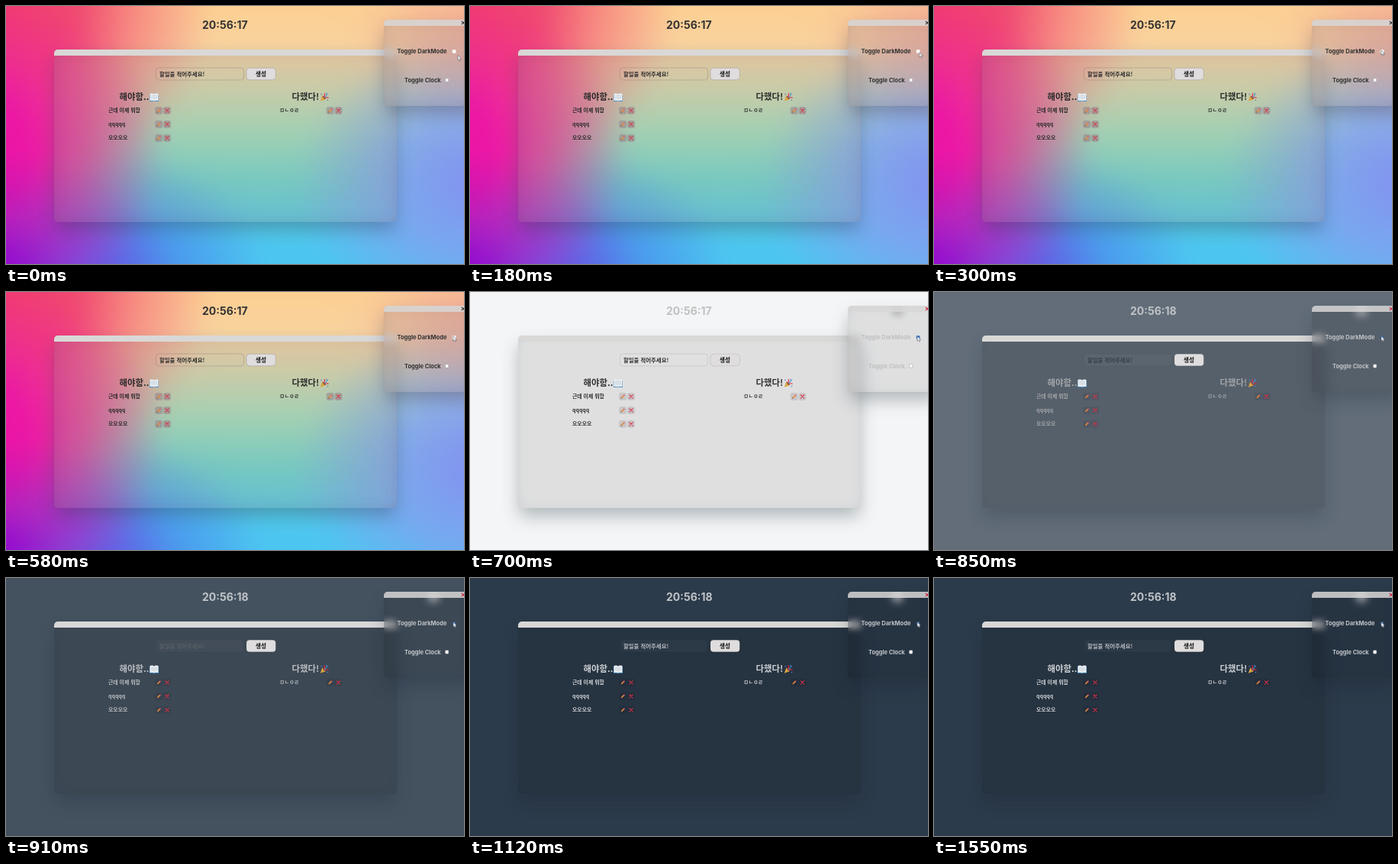
Animation, 600 px wide and 338 px high, one loop 1580 ms. Source, as an HTML page:

```html
<!DOCTYPE html>
<html lang="ko">
<head>
<meta charset="utf-8">
<title>Todo dark mode</title>
<style>
@property --page { syntax: "<color>"; inherits: true; initial-value: #fff; }
@property --soft { syntax: "<color>"; inherits: true; initial-value: #333; }
@property --head { syntax: "<color>"; inherits: true; initial-value: #2b2b2b; }
@property --hint { syntax: "<color>"; inherits: true; initial-value: #2b2b2b; }
@property --glass { syntax: "<color>"; inherits: true; initial-value: #0000; }
@property --chip { syntax: "<color>"; inherits: true; initial-value: #0000; }
@property --rim { syntax: "<color>"; inherits: true; initial-value: #0000; }
@property --shade { syntax: "<color>"; inherits: true; initial-value: #0000; }
@property --check { syntax: "<color>"; inherits: true; initial-value: #fff; }

:root { animation: tone 1580ms linear infinite, hint 1580ms linear infinite; }
html, body { margin: 0; width: 100%; height: 100%; overflow: hidden; }
.stage { position: relative; width: 600px; height: 338px; overflow: hidden; background: var(--page); }
.stage > * { position: absolute; }
svg { left: 0; top: 0; width: 600px; height: 338px; }

/* Wallpaper: soft blobs over a vertical blend, oversized so the blur has no edge */
.sky {
  inset: -60px;
  filter: blur(14px);
  background:
    radial-gradient(230px 150px at 50px 400px, #9000d0, #9a10d099 35%, transparent),
    radial-gradient(270px 220px at 0 250px, #ee10a8, #ec18a4 35%, #ec2896bf 60%, transparent),
    radial-gradient(290px 260px at 40px 60px, #f23c69, #f04a70 40%, #f56e78b3 65%, transparent),
    radial-gradient(170px 110px at 680px 100px, #eb9696b3, transparent),
    radial-gradient(240px 190px at 680px 290px, #8290f2, #82a0f0cc 50%, transparent),
    radial-gradient(190px 160px at 210px 410px, #4a82ec, #4a8cecb3 45%, transparent),
    linear-gradient(#fdd092 60px, #f6d2a0 120px, #d5dcae 170px, #a0e2bc 230px, #6cd8cc 290px, #4cc6f0 370px);
  animation: day 1580ms step-end infinite;
}
.panel {
  background: var(--glass);
  box-shadow: 0 12px 22px -2px var(--shade), inset 0 0 22px -4px var(--rim);
  border-radius: 5px;
  overflow: hidden;
}
.panel::before { content: ""; display: block; height: 8px; background: #d9d8d7; }
.main { left: 63px; top: 57px; width: 449px; height: 226px; }
.side { left: 495px; top: 18px; width: 120px; height: 113px; backdrop-filter: blur(5px); }
.side::before { opacity: .85; }
.ghost { left: 552px; top: 18px; width: 16px; height: 14px; border-radius: 6px; background: var(--soft); animation: night 1580ms step-end infinite; }

text { font: 700 7.5px Inter, sans-serif; fill: var(--soft); }
.ko text { font-family: "Noto Sans CJK KR", "Noto Sans CJK", sans-serif; font-size: 6.9px; fill: var(--head); }
.ko .title { font-size: 11.4px; }
.ko .hint { font-size: 7.4px; fill: var(--hint); }
.ko .press { font-size: 7.6px; fill: #111; }
.clock { font-size: 14px; }
.sec17 { animation: day 1580ms -110ms step-end infinite; }
.before { animation: before 1580ms step-end infinite; }
.after { animation: after 1580ms step-end infinite; }
.close { fill: none; stroke-width: 1.1; animation: close 1580ms step-end infinite; }
.cursor { animation: move 1580ms linear infinite; }

@keyframes tone {
  0%, 42.69% {
    --page: #fff; --soft: #333; --head: #2b2b2b; --glass: rgba(155,148,150,.22);
    --chip: rgba(150,130,136,.55); --rim: rgba(80,55,80,.2);
    --shade: rgba(40,50,80,.32); --check: #fff;
  }
  42.7% {
    --page: #fff; --soft: #c0c0c0; --head: #2b2b2b; --glass: rgba(10,0,8,.085);
    --chip: rgba(110,100,105,.2); --rim: rgba(60,60,60,.12);
    --shade: rgba(60,78,84,.38); --check: #2968c8;
    animation-timing-function: ease;
  }
  67.7%, 100% {
    --page: #2c3b4b; --soft: #c0c4c8; --head: #cdd0d3; --glass: rgba(0,0,0,.12);
    --chip: rgba(20,20,45,.14); --rim: rgba(20,28,40,.06);
    --shade: rgba(20,28,45,.25); --check: #35618a;
  }
}
@keyframes hint {
  0%, 42.7% { --hint: #2b2b2b; }
  53.8% { --hint: #394048; }
  69%, 100% { --hint: #b6babf; }
}
@keyframes day { 0% { opacity: 1; } 42.7%, 100% { opacity: 0; } }
@keyframes night { 0% { opacity: 0; } 42.7%, 100% { opacity: .8; } }
@keyframes before { 0% { opacity: 1; } 50%, 100% { opacity: 0; } }
@keyframes after { 0% { opacity: 0; } 50%, 100% { opacity: 1; } }
@keyframes close { 0% { stroke: #333; } 42.7%, 100% { stroke: #d21f3c; } }
@keyframes move {
  0%, 1.5% { transform: translate(592px, 64.5px); }
  19%, 100% { transform: translate(586px, 57.7px); }
}
</style>
</head>
<body>
<div class="stage">
  <div class="sky"></div>
  <div class="panel main"></div>
  <div class="ghost"></div>
  <div class="panel side"></div>
  <svg viewBox="0 0 600 338">
    <defs>
      <g id="tools">
        <rect x="-5" y="-5" width="10" height="10" rx="3" fill="var(--chip)"/>
        <rect x="5.8" y="-5" width="10" height="10" rx="3" fill="var(--chip)"/>
        <path d="M-2 2L1.6 -1.6" stroke="#e8883a" stroke-width="1.6"/>
        <path d="M1.3 -1.3L2.3 -2.3" stroke="#e0606c" stroke-width="1.6"/>
        <path d="M-2.8 2.8L-2.3 1.2L-1.2 2.3Z" fill="#5b4335"/>
        <path d="M8.7 -2.1L12.9 2.1M12.9 -2.1L8.7 2.1" stroke="#dd2e44" stroke-width="1.2" stroke-linecap="round"/>
      </g>
    </defs>

    <g class="clock">
      <text class="clock before" x="257" y="30">20:56:17</text>
      <text class="clock after" x="257" y="30">20:56:18</text>
    </g>

    <g stroke="var(--rim)">
      <rect x="196.5" y="81" width="115" height="16" rx="4" fill="rgba(255,255,255,.03)"/>
      <rect x="315" y="81.2" width="38.3" height="15.6" rx="4" fill="#dfdddd"/>
    </g>

    <g class="ko">
      <text class="hint" x="201" y="92.2">할일을 적어주세요!</text>
      <text class="press" x="327" y="92.2">생성</text>
      <text class="title" x="148.5" y="123.4">해야함..</text>
      <text class="title" x="374.5" y="123.4">다했다!</text>
      <text x="134" y="139">근데 이제 뭐함</text>
      <text x="134" y="157">qqqqq</text>
      <text x="134" y="175">오오오오</text>
      <text x="358.5" y="139">ㅁㄴㅇㄹ</text>
    </g>

    <g transform="translate(188 114)">
      <path d="M0 2.4H12V10.8H0Z" fill="#3b88c3"/>
      <path d="M.5 1Q4 0 6 1.6Q8 0 11.5 1V10Q8 9.2 6 10.4Q4 9.2 .5 10Z" fill="#eef2f5"/>
      <path d="M6 1.6V10.2M2 3.2H4.8M2 5H4.8M2 6.8H4.8M7.2 3.2H10M7.2 5H10M7.2 6.8H10" stroke="#a5b4c0" stroke-width=".6"/>
    </g>
    <g transform="translate(411 113.5)">
      <path d="M.8 11.2L3.4 3.8L8.2 8.6Z" fill="#d9a441"/>
      <path d="M3.4 3.8Q6.6 5 8.2 8.6Q4.6 8.4 3.4 3.8Z" fill="#8a4b3c"/>
      <path d="M5.4 5.6Q7.4 3.6 6 .8M7 7Q9.4 5.6 11.6 7" fill="none" stroke="#dd2e44" stroke-width="1.1"/>
      <path d="M6.4 6.2Q8.4 4.6 10.6 1.2" fill="none" stroke="#4a90d0" stroke-width="1.1"/>
      <path d="M2 2h.1M10.4 10h.1M8.6 1h.1" stroke="#5c7fc4" stroke-width="1.6" stroke-linecap="round"/>
    </g>

    <use href="#tools" x="200.2" y="137"/>
    <use href="#tools" x="200.2" y="155"/>
    <use href="#tools" x="200.2" y="173"/>
    <use href="#tools" x="424.7" y="137"/>

    <text x="512.5" y="62.2">Toggle DarkMode</text>
    <text x="522" y="99.8">Toggle Clock</text>
    <rect x="584.8" y="57.2" width="4.6" height="4.6" rx=".8" fill="var(--check)"/>
    <rect x="575.4" y="94.8" width="4.4" height="4.4" rx=".8" fill="#fff" stroke="#777" stroke-width=".4"/>
    <path class="close" d="M596.8 19.8L601.2 24.2M601.2 19.8L596.8 24.2"/>

    <path class="cursor" d="M0 0V6.4L1.5 5.1L2.5 7.3L3.5 6.8L2.6 4.7H4.5Z" fill="#fff" stroke="#3a4350" stroke-width=".5" stroke-linejoin="round"/>
  </svg>
</div>
</body>
</html>
```
